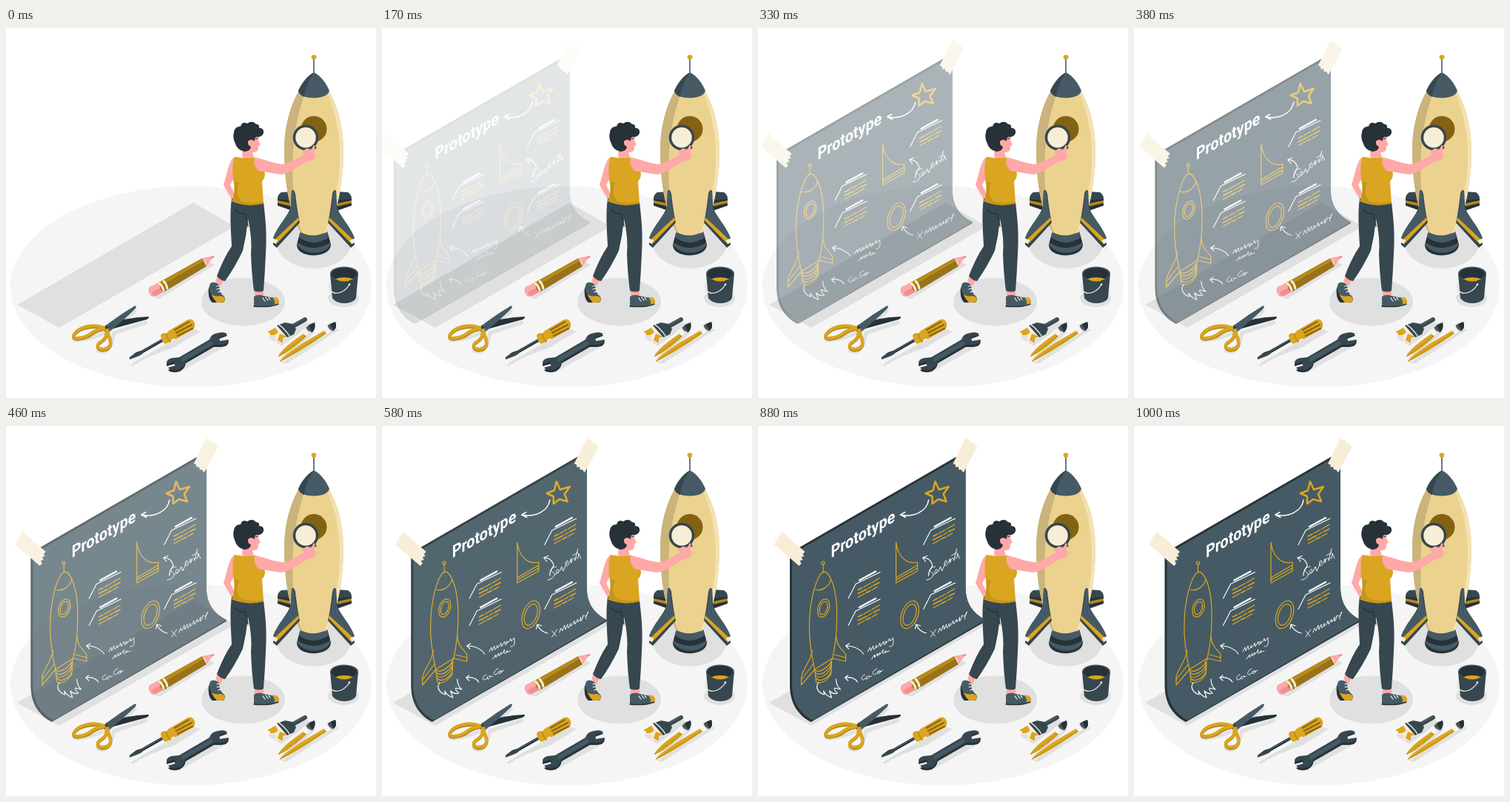
These frames come from a looping animation (500x500 px, 1040 ms). An HTML page:

```html
<!DOCTYPE html>
<html lang="en">
<head>
<meta charset="utf-8">
<title>Prototype</title>
<style>
html, body { margin: 0; height: 100%; overflow: hidden; background: #fff; }
svg { display: block; width: 100vw; height: 100vh; }
.line { fill: none; stroke-linecap: round; stroke-linejoin: round; }
.gold { fill: #daa520; }
.shade { fill: #e0e0e0; }
.slate { fill: #455a64; }
.dark { fill: #37474f; }
.ink { fill: #263238; }
.skin { fill: #ffa8a7; }
.cream { fill: #f8eed7; }
text { font: 700 22.8px Roboto, Arial, sans-serif; fill: #fff; }
</style>
</head>
<body>
<svg viewBox="0 0 500 500">
  <defs>
    <g id="note" class="line">
      <path d="M0 -.5 10 -20 43 -36" stroke="#fff" stroke-width="1.1"/>
      <path d="M15 -25 37 -37" stroke="#fff" stroke-width="2.4"/>
      <path d="M13 -12 19 -15M21 -16 30 -21M32 -22 42 -28M13 -7 25 -13M27 -14 32 -17M34 -18 42 -22M13 -2 22 -7M24 -8 30 -11M32 -12 39 -16" stroke="#daa520" stroke-width="1.4"/>
    </g>
  </defs>

  <!-- floor and shadows -->
  <ellipse cx="250" cy="349.5" rx="244" ry="136" fill="#f5f5f5"/>
  <path class="shade" d="M15 374 253 236 309 268 72 405Z"/>
  <ellipse class="shade" cx="416" cy="290" rx="50" ry="35"/>
  <ellipse class="shade" cx="320.5" cy="370" rx="56.5" ry="32.5"/>
  <ellipse class="shade" cx="456" cy="365" rx="21" ry="12"/>

  <!-- blueprint -->
  <g id="board">
    <path class="ink" d="M41.5 171.500 277 35.500 279 36V218C279 240 289 253 306 262V264L70 400C51 390 41.500 373 41.500 350Z"/>
    <path class="slate" d="M44.500 173 279 37.500V218C279 240 289 253 306 262L72.500 397.500C54 388 44.500 372 44.500 349Z"/>
    <text transform="matrix(.866 -.5 0 1 97 178.500)">Prototype</text>

    <g class="line" stroke="#daa520" stroke-width="1.2">
      <circle cx="86.500" cy="185" r="2"/>
      <path d="M86.500 187V198M83 200Q88 195 92 199C101 209 106 233 105 262C105 283 102 301 99 314L75 329C70 307 67 285 68 264C69 237 75 212 83 200M76 221C84 224 95 217 97 207"/>
      <ellipse cx="87" cy="246" rx="7.500" ry="12.500" transform="rotate(18 87 246)"/>
      <ellipse cx="87" cy="246" rx="5" ry="9" transform="rotate(18 87 246)"/>
      <path d="M72 303C69 319 60 327 57 339V350L75 329M57 343 73 322M104 284C105 300 115 303 117 309V318L99 314M102 309 117 313"/>
      <path d="M75 329C79 336 96 326 99 314M76 333C80 340 96 331 98 319M76 337C81 344 96 335 98 322M77 341C82 347 95 341 98 329M75 329 77 346Q87 350 97 336L98 319"/>
      <path d="M185 157V212L214 196V184C202 187 188 180 185 157M185 205 214 188M185 208 214 192"/>
      <ellipse cx="203.500" cy="255" rx="11" ry="19.500" transform="rotate(20 203.500 255)"/>
      <ellipse cx="203.500" cy="255" rx="8" ry="15" transform="rotate(20 203.500 255)"/>
      <path stroke-width="2.500" d="M238 75 243 86 256 82 249 92 253 102 242 99 234 105 234 95 225 91 235 87Z"/>
    </g>

    <use href="#note" x="120.500" y="233.500"/>
    <use href="#note" x="120.500" y="270"/>
    <use href="#note" x="222" y="161"/>
    <use href="#note" x="222" y="248"/>

    <g class="line" stroke="#fff">
      <path stroke-width="1.500" d="M229 100C227 115 209 124 191 120M197 116.500 191 120 198 123.500"/>
      <path stroke-width="1.200" d="M80 347C75 354 81 361 88 363L87 358Q91 365 98 367L95 358Q100 363 106 361Q101 357 102 354L110 356Q104 351 104 342"/>
      <path stroke-width="1.200" d="M229 202C229 190 237 192 233 185Q230 178 221 178M227 175.500 221 178 225 183M226 280C217 278 214 273 212 268M211 274 212 268 218 270M141 308C136 301 127 297 117 297M122 294 117 297 121 301M133 346C129 340 123 339 116 340M120 337 116 340 120 344"/>
      <g stroke-width=".9">
        <path d="M238 190C230 191 229 197 234 198C238 201 232 208 226 208M236 201C242 198 242 192 239 194C235 198 239 202 243 195L245 190 247 196 251 187C255 184 254 180 251 183C249 189 253 192 256 184L258 179V185C260 178 263 176 263 182L267 166M260 175 267 171M265 178C267 182 268 176 268 172L271 179"/>
        <path d="M232 277 238 284M239 275 232 285M242 279 244 273 246 277 249 269 250 275 253 268 254 273C260 268 257 264 256 269Q257 273 261 266L262 263 263 268 267 261V265Q271 262 271 258V264Q274 260 274 256C280 260 280 250 281 251Q277 258 278 261"/>
        <path d="M147 305 150 299 151 304 154 297 155 302C161 298 159 294 157 298Q158 302 162 296L163 293 164 298 168 291 169 296C174 292 172 289 170 292Q170 296 175 290L176 287 177 291 181 286Q183 300 176 298M152 315 156 309V313L160 307V311C165 307 163 304 162 308Q163 311 168 302Q166 309 169 307C174 303 171 302 170 306L176 304"/>
        <path d="M143 336C137 338 138 344 141 343Q144 342 146 338C142 343 147 344 149 338C147 336 147 340 152 338M159 328C152 331 153 337 156 336Q160 334 161 331C158 336 163 336 164 331Q161 329 163 333L167 330"/>
      </g>
    </g>

    <path class="cream" d="M30 142 62 170 59 173 61 176 57 177 59 181 55 182 57 186 54 189 20 160 23 157 22 154 26 153 25 149 29 147Z"/>
    <path class="cream" d="M279 16 282 19 285 19 287 23 290 22 292 26 295 28 276 63 273 59 270 59 269 55 266 56 265 52 262 51Z"/>
  </g>

  <!-- pencil -->
  <path class="shade" d="M194 362 276 317 282 320 207 366Z"/>
  <path class="skin" d="M206 344 194 350Q191 354 194 359Q197 364 202 362L214 356Z"/>
  <path fill="#f28f8f" d="M210 350 197 357Q198 363 202 362L214 356Z"/>
  <path fill="#b68a1b" d="M205 344.500 265 311 268 316 213 357Z"/>
  <path fill="#98731a" d="M208 349 267 315 271 322 213 357Q208 354 208 349Z"/>
  <path class="skin" d="M265 311 281 308 271 322Q271 316 265 311Z"/>
  <path fill="#ef8484" d="m277 309 5-1-3 4z"/>
  <path class="line" stroke="#f8eed7" stroke-width="3" d="M207 345Q212 349 213 355M213 342Q217 346 218 352"/>

  <!-- scissors -->
  <path class="line" stroke="#e0e0e0" stroke-width="5" d="M92 421Q98 426 137 411L174 383M124 436Q136 442 142 426L146 412 189 398"/>
  <path class="ink" d="M134 402Q160 391 192 390Q195 391 190 394L142 407 136 411Z"/>
  <path class="slate" d="M131 405Q150 390 174 375.500Q177 375 175 379Q160 394 139 411L133 410Z"/>
  <path class="line" stroke="#b68a1b" stroke-width="4.500" d="M132 406C118 401 97 406 92 415C88 424 105 420 113 416Q119 410 132 407M137 409C138 419 143 421 141 429C137 438 124 437 124 430C124 423 137 426 136 409"/>
  <path class="line" stroke="#daa520" stroke-width="4" d="M132 404.500C118 399 97 404 92 414C88 422 105 419 113 414Q119 408 132 406M137 408C138 418 143 420 141 428C137 436 124 435 124 429C124 422 137 425 136 408"/>
  <circle class="ink" cx="136" cy="405" r="1.500"/>

  <!-- screwdriver -->
  <path class="shade" d="M169 454 211 430 253 406 263 410 226 432Q190 444 171 457Z"/>
  <path class="line" stroke="#263238" stroke-width="4" d="M178 441 213 421"/>
  <path class="line" stroke="#455a64" stroke-width="2" d="M178 440 213 420"/>
  <path class="dark" d="M183 436 176 438 167 445V448L180 443 185 440Z"/>
  <path class="gold" d="M209 415Q211 411 217 413L220 409 246 394Q252 392 255 399Q256 404 253 407L230 420 225 420 222 424 215 427Q209 422 209 415Z"/>
  <path class="line" stroke="#8a6914" stroke-width="2.300" d="M228 408 247 397M230 412 251 401M232 416 252 406"/>
  <path class="line" stroke="#b68a1b" stroke-width="1.500" d="M217 413Q217 419 222 424"/>

  <!-- wrench -->
  <path class="shade" d="M220 462 298 423 301 428 235 465Z"/>
  <path class="ink" d="M217 457Q216 451 224 449L234 447 275 424Q277 415 287 414Q296 412 299 416L288 420 289 425 301 423Q301 430 291 431L281 431 243 453Q241 463 231 465Q222 466 219 462L229 459 228 454Z"/>
  <path class="dark" d="M217 454Q216 448 224 446L234 445 275 421Q277 413 287 412Q296 410 299 414L288 418 289 423 301 421Q301 427 291 428L281 428 243 450Q241 460 231 462Q222 463 219 459L229 456 228 451Z"/>
  <path class="line" stroke="#455a64" stroke-width="5" d="M239 448 277 426"/>

  <!-- brushes -->
  <path class="shade" d="M354 418 374 407 406 397 411 399 394 414 372 430ZM370 447 414 409 419 410 378 447ZM371 453 446 406 450 408 380 453Z"/>
  <path class="line" stroke="#37474f" stroke-width="6" d="M386 404 404 394"/>
  <path class="line" stroke="#455a64" stroke-width="3" d="M386 402.500 404 392.500"/>
  <path class="cream" d="M366 403 354 411Q359 413 357 415L365 417 363 424 369 424 378 416Z"/>
  <path class="gold" d="M364 405 353 411Q359 412 356 415L363 415 368 411ZM370 413 367 422Q372 425 374 425L374 419 380 417Z"/>
  <path class="dark" d="M366 402 377 398 388 400 392 407 389 414 380 418Z"/>
  <path class="line" stroke="#fff" stroke-width="1.300" d="M369 401Q377 407 383 416"/>
  <path class="gold" d="M368 443Q374 432 402 413L406 417Q381 440 368 444ZM370 450Q380 437 430 409L433 413Q392 441 370 451Z"/>
  <path class="line" stroke="#b68a1b" stroke-width="1" d="M369 443.500 405 416M371 450 432 412.500"/>
  <path class="slate" d="M405 405 411 400 417 398Q419 406 414 411L409 412ZM434 402 440 399 445 397Q448 404 443 409L438 410Z"/>
  <path class="ink" d="M409 402 417 398Q419 406 414 411ZM438 400 445 397Q448 404 443 409Z"/>
  <path class="line" stroke="#f8eed7" stroke-width="2" d="M405 406Q407 411 411 411M434 403Q435 408 439 409"/>

  <!-- bucket -->
  <path class="dark" d="M438 332 441 365Q446 372 457 372Q469 372 473 365L476 332Z"/>
  <ellipse class="slate" cx="457" cy="332" rx="19" ry="9.500"/>
  <ellipse class="ink" cx="457" cy="332.500" rx="17.500" ry="8.500"/>
  <path class="gold" d="M445 339Q457 335 469 339Q457 346 445 339Z"/>
  <path class="line" stroke="#e0e0e0" stroke-width="1.400" d="M437 345C435 364 456 361 464 347"/>
  <circle cx="464" cy="346.500" r="1.300" fill="#fff"/>

  <!-- rocket -->
  <g id="backfin">
    <path class="ink" d="M388 222 372 223Q367 226 367 232V240L387 247Z"/>
    <path class="dark" d="M388 221 372 222Q367 225 367 231L388 233Z"/>
    <path fill="#b68a1b" d="M367 233 386 237V241L367 236.500Z"/>
  </g>
  <use href="#backfin" transform="matrix(-1 0 0 1 834 0)"/>
  <path class="line" stroke="#455a64" stroke-width="1.600" d="M416 42V62"/>
  <circle class="gold" cx="416" cy="39.500" r="3.300"/>
  <path class="ink" d="M397 278 393 293C393 312 438 312 439 293L435 278Z"/>
  <path class="slate" d="M398 274 393 293Q403 304 416 304Q431 304 439 293L434 274Z"/>
  <path class="ink" d="M396 283Q416 297 436 283L438 290Q416 304 394 290Z"/>
  <path fill="#ecd28f" d="M416 60C440 80 456 121 456 165C456 214 446 253 434 275Q416 285 398 276C384 250 376 213 376 165C376 121 392 80 416 60Z"/>
  <path fill="#cab47b" d="M416 60C392 80 376 121 376 165C376 213 384 250 398 276L400 277C388 246 386 211 388 165C390 126 402 92 412 64Z"/>
  <path fill="#f4e2b5" d="M425 70C442 92 456 126 456 165C456 214 446 253 434 275L430 278C442 246 452 214 451 165C450 128 440 94 425 70Z"/>
  <path class="slate" d="M416 60C405 66 398 78 395 85Q397 94 416 94.500Q434 94 437 85C433 75 426 65 416 60Z"/>
  <path class="dark" d="M416 60C405 66 398 78 395 85Q397 91 403 93C404 83 409 70 416 60Z"/>
  <circle cx="416" cy="136.500" r="17.500" fill="#836313"/>
  <g id="fin">
    <path class="dark" d="M386 220Q389 217 391 224C393 242 395 254 397 263L366 297 361 293V284C367 267 382 254 385 241Z"/>
    <path class="slate" d="M386 220Q389 217 390 224C391 240 393 250 395 255L368 285 361 284C367 267 382 254 385 241Z"/>
    <path class="gold" d="M395 256 396 260 366 291 362 287Z"/>
    <path class="cream" d="M361 284 367 287 365 292 361 290Z"/>
  </g>
  <use href="#fin" transform="matrix(-1 0 0 1 832 0)"/>

  <!-- person -->
  <path class="skin" d="M283 342 286 334 295 339 290 349ZM336 354H348L348 364H336Z"/>
  <path class="slate" d="M276 345Q282 341 288 347Q288 358 295 363Q298 369 293 371L279 371Q273 362 274 352Z"/>
  <path class="gold" d="M276 359Q283 364 289 362Q296 362 296 368Q293 373 280 370Q275 366 276 359Z"/>
  <path class="ink" d="M274 350Q277 363 285 371L279 371Q272 366 274 350Z"/>
  <path class="line" stroke="#fff" stroke-width="1.200" d="M285 349 288 348M285 353 289 352M287 357 291 355"/>
  <path class="slate" d="M335 363Q341 359 348 362L359 364Q369 363 369 371Q358 378 335 377Z"/>
  <path class="gold" d="M360 364Q369 362 369 371Q367 374 363 374.500Q364 369 360 364Z"/>
  <path class="line" stroke="#263238" stroke-width="1.500" d="M335 376Q357 378 368 373"/>
  <path class="line" stroke="#fff" stroke-width="1.200" d="M347 365 350 369M351 364 354 368M355 364 357 367"/>
  <path class="dark" d="M305 230C302 252 304 272 305 295Q295 309 285 335Q289 341 296 342Q309 324 320 301Q325 280 327 258Q333 285 331 306Q332 333 335 355Q342 358 348 355Q350 329 351 305C353 275 350 253 348 236Z"/>
  <path class="line" stroke="#263238" stroke-width="1.300" d="M310 246Q315 252 323 251Q326 259 327 268"/>
  <path class="skin" d="M309 174C301 179 300 193 294 212Q299 222 305 231L308 223 303 212 311 199Z"/>
  <path class="skin" d="M320 162 319 174Q326 179 335 175L332 164Z"/>
  <path class="gold" d="M309 174Q322 177 338 175Q347 182 350 197Q350 203 346 207L348 237Q326 243 305 234Q311 218 307 204Q305 184 309 174Z"/>
  <path fill="#c5951d" d="M315 208Q309 222 316 232Q325 239 348 235V237Q326 243 305 234Q311 218 308 208Z"/>
  <path class="skin" d="M336 176C347 175 360 184 376 184Q390 179 402 171Q399 165 404 164L410 165 416 157Q419 158 416 166Q421 173 416 178Q405 180 394 188Q383 197 371 198Q352 195 341 193Q333 184 336 176Z"/>
  <circle class="cream" cx="405" cy="148" r="15.500" stroke="#37474f" stroke-width="3.500"/>
  <path class="line" stroke="#37474f" stroke-width="3" d="M416 159 418 162"/>
  <path class="skin" d="M402 166Q407 160 412 165L416 158Q419 159 416 168L411 174Z"/>
  <path class="skin" d="M326 146 340 142Q343 149 341 152L344 158 341 159Q342 168 335 168L325 167Z"/>
  <path class="ink" d="M308 141Q309 133 317 133Q319 126 326 129Q333 124 338 130Q343 130 342 135Q349 135 348 142Q346 148 339 147Q335 148 336 153Q331 149 327 153Q326 157 331 160Q330 167 322 167Q312 165 309 154Q306 147 308 141Z"/>
  <path class="skin" d="M334 154Q327 149 327 156Q329 162 334 159Z"/>
  <path class="line" stroke="#263238" stroke-width="1" d="M337 150 340 149"/>
</svg>
<script>
const board = document.getElementById('board');
const LOOP = 1040, SLIDE = 1000, LEAD = 30;

const bezier = (a, b, s) => 3 * (1 - s) ** 2 * s * a + 3 * (1 - s) * s * s * b + s ** 3;

// Overshooting ease: find the curve parameter for time x by bisection.
function ease(x) {
  let lo = 0, hi = 1;
  for (let i = 0; i < 24; i++) {
    const mid = (lo + hi) / 2;
    if (bezier(.36, .5, mid) < x) lo = mid; else hi = mid;
  }
  return bezier(-.01, 1.38, lo);
}

function draw() {
  const t = performance.now() % LOOP;
  const p = t < 40 ? 0 : ease(Math.min(1, (t + LEAD) / SLIDE));
  board.setAttribute('transform', `translate(${30 * (p - 1)} 0)`);
  board.setAttribute('opacity', Math.max(0, Math.min(1, p)));
  requestAnimationFrame(draw);
}
draw();
</script>
</body>
</html>
```
